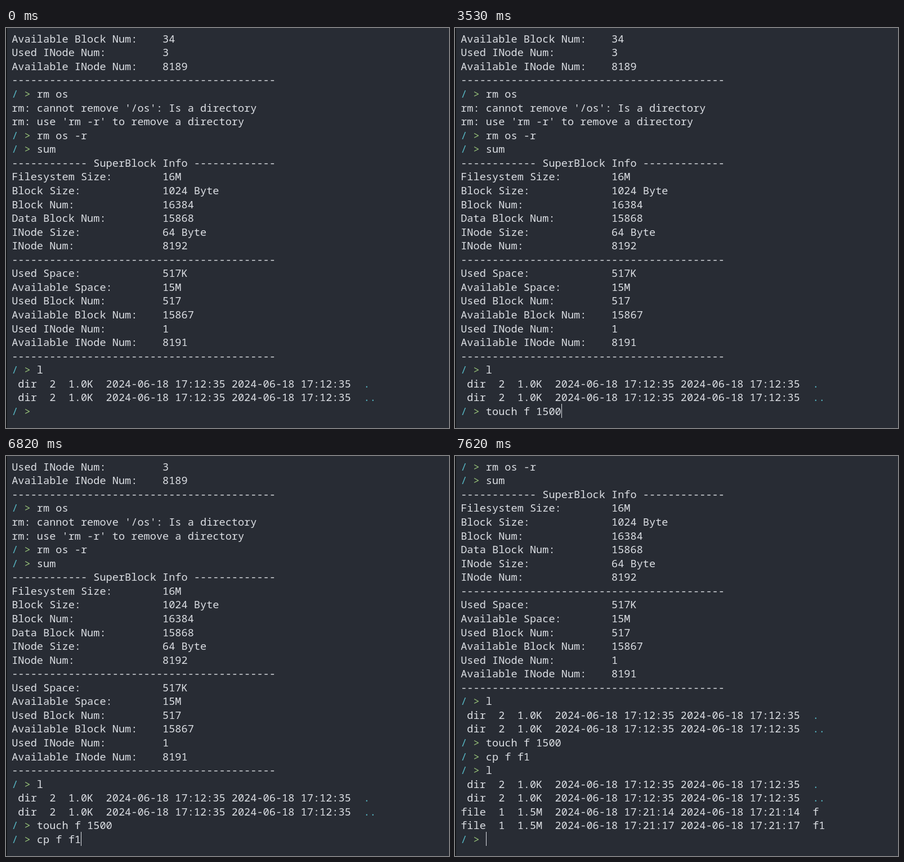
Recreate the animation shown at these times as an HTML page with a canvas. Size 787 by 712 pixels, loop 8000 ms.

```html
<!DOCTYPE html>
<html lang="en">
<head>
<meta charset="utf-8">
<title>Terminal session</title>
<style>
  html, body { margin: 0; width: 100%; height: 100%; overflow: hidden; background: #282c34; }
  canvas { display: block; }
</style>
</head>
<body>
<canvas id="screen" width="787" height="712"></canvas>
<script>
const ctx = document.getElementById("screen").getContext("2d");
const LOOP = 8000, ROWS = 28, CELL = 11.16, PITCH = 24.56, BLINK = 600;
const FG = "#dcdfe4", BG = "#282c34", CYAN = "#56b6c2", GREEN = "#98c379";

const PROMPT = "/ > ";
const RULE = "-".repeat(42);
const field = (label, value) => (label + ":").padEnd(24) + value;
const entry = (kind, links, size, time, name) => {
  const stamp = "2024-06-18 " + time;
  return `${kind.padStart(4)}  ${links}  ${size}  ${stamp} ${stamp}  ${name}`;
};
const folders = [".", ".."].map(name => entry("dir", 2, "1.0K", "17:12:35", name));

const history = [
  field("Available Block Num", 34),
  field("Used INode Num", 3),
  field("Available INode Num", 8189),
  RULE,
  PROMPT + "rm os",
  "rm: cannot remove '/os': Is a directory",
  "rm: use 'rm -r' to remove a directory",
  PROMPT + "rm os -r",
  PROMPT + "sum",
  "------------ SuperBlock Info -------------",
  field("Filesystem Size", "16M"),
  field("Block Size", "1024 Byte"),
  field("Block Num", 16384),
  field("Data Block Num", 15868),
  field("INode Size", "64 Byte"),
  field("INode Num", 8192),
  RULE,
  field("Used Space", "517K"),
  field("Available Space", "15M"),
  field("Used Block Num", 517),
  field("Available Block Num", 15867),
  field("Used INode Num", 1),
  field("Available INode Num", 8191),
  RULE,
  PROMPT + "l",
  ...folders,
  PROMPT
].join("\n");

const listing = [
  "",
  ...folders,
  entry("file", 1, "1.5M", "17:21:14", "f"),
  entry("file", 1, "1.5M", "17:21:17", "f1"),
  PROMPT
].join("\n");

// Each event appends text and restarts the cursor blink.
const events = [
  [70, ""],
  [1070, "t"], [1140, "o"], [1210, "u"], [1310, "c"], [1380, "h"],
  [1840, " "], [1990, "f"], [2660, " "],
  [2990, "1"], [3270, "5"], [3400, "0"], [3530, "0"],
  [3800, "\n"], [3870, PROMPT],
  [4930, "c"], [5000, "p"], [5400, " "], [5600, "f"],
  [6330, " "], [6550, "f"], [6820, "1"],
  [7020, "\n"], [7090, PROMPT],
  [7420, "l"], [7620, listing]
];

function colorAt(line, col) {
  if (line.startsWith(PROMPT)) {
    if (col === 0) return CYAN;
    if (col === 2) return GREEN;
  }
  return col >= 56 && line[col] === "." ? CYAN : FG;
}

function drawLine(line, row) {
  const baseline = Math.round(25.8 + row * PITCH);
  [...line].forEach((char, col) => {
    if (char === " ") return;
    ctx.fillStyle = colorAt(line, col);
    ctx.fillText(char, 10.2 + col * CELL, baseline);
  });
}

function draw(time) {
  const past = events.filter(([at]) => at <= time);
  const lines = (history + past.map(([, text]) => text).join("")).split("\n").slice(-ROWS);

  ctx.fillStyle = BG;
  ctx.fillRect(0, 0, 787, 712);
  ctx.fillStyle = "#0b0c0e";
  ctx.fillRect(0, 0, 1.5, 712);

  ctx.font = '18.6px "Noto Sans Mono", monospace';
  lines.forEach(drawLine);

  if (past.length && time - past.at(-1)[0] < BLINK) {
    ctx.fillStyle = FG;
    ctx.fillRect(Math.floor(10.8 + lines.at(-1).length * CELL), 669, 1, 25);
  }
}

const start = performance.now();
function tick() {
  draw((performance.now() - start) % LOOP);
  requestAnimationFrame(tick);
}
tick();
</script>
</body>
</html>
```
